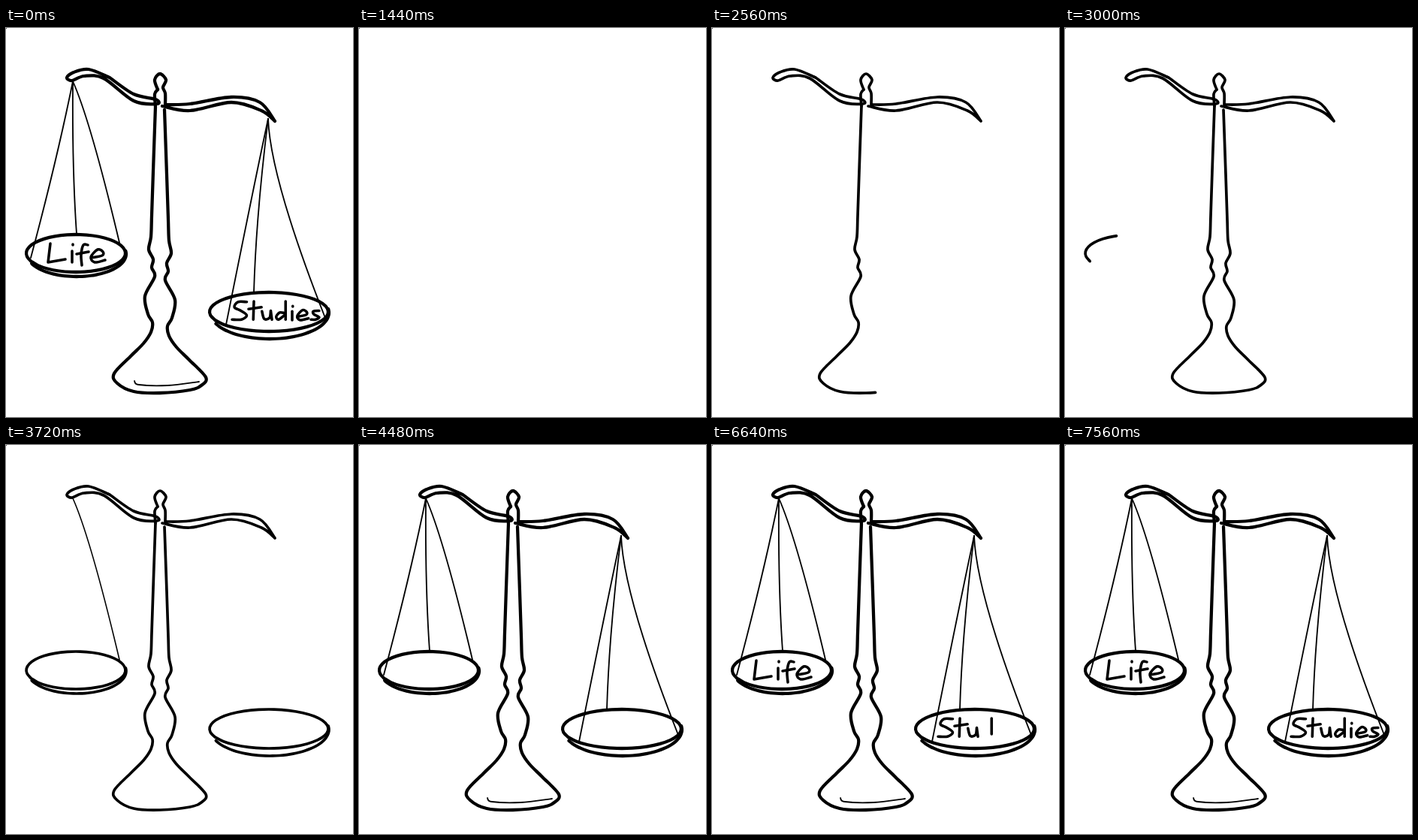
Animation, 462 px wide and 518 px high, one loop 8400 ms. Source, as an HTML page:

```html
<!DOCTYPE html>
<html lang="en">
<head>
<meta charset="utf-8">
<title>Life and Studies on a balance</title>
<style>
  html, body { margin: 0; width: 100%; height: 100%; overflow: hidden; background: #fff; }
  svg { display: block; width: 462px; height: 518px; }
  path { fill: none; stroke: #000; stroke-linecap: round; stroke-linejoin: round; }
</style>
</head>
<body>
<svg id="stage" viewBox="0 0 462 518" role="img" aria-label="Scales: Life against Studies">
  <rect width="1" height="1" fill="#444"/>
</svg>
<script>
const LOOP = 8400, STEP = 40, CLEAR = 1440, INKED = 4440;
const BODY = 3.7, THIN = 1.6, PEN = 3.1, INK_SPREAD = 1.15;

const parse = text => text.split(' ').map(pair => pair.split(',').map(Number));

// Smooth curve through every point; a repeated point makes a corner
function curve(p) {
  let d = `M${p[0]}`;
  for (let i = 0; i < p.length - 1; i++) {
    const a = p[i], b = p[i + 1], before = p[i - 1] || a, after = p[i + 2] || b;
    if (String(a) === String(b)) continue;
    const c1 = a.map((v, k) => v + (b[k] - before[k]) / 6);
    const c2 = b.map((v, k) => v - (after[k] - a[k]) / 6);
    d += `C${c1} ${c2} ${b}`;
  }
  return d;
}

const sketch = text => curve(parse(text));

// Turned column: one side runs down, the foot crosses, the mirrored side runs back up
function column(axis, profile, foot, drop) {
  const half = parse(profile);
  const left = half.map(([r, y]) => [axis - r, y]);
  const right = half.map(([r, y]) => [axis + r, y + drop]).reverse();
  return curve([...left, ...parse(foot), ...right]);
}

function arc(cx, cy, rx, ry, from, to) {
  return curve(Array.from({ length: 25 }, (_, i) => {
    const angle = (from + (to - from) * i / 24) * Math.PI / 180;
    return [cx + rx * Math.cos(angle), cy + ry * Math.sin(angle)];
  }));
}

// A dish and the lower rim under it
const pan = (cx, cy, rx, ry, depth) => [
  arc(cx, cy, rx, ry, 155, 515),
  arc(cx + 1, cy + 1, rx, ry + depth, 155, -8),
];

// Letter strokes relative to the baseline
const glyphs = {
  L: '3,-25 0,0 0,0 23,-4',
  i: '0,-15 0,0|1,-24 1,-23',
  f: '15,-23 9,-23 6,-10 7,4|0,-11 16,-14',
  e: '1,-6 16,-9 17,-14 10,-17 1,-7 6,0 20,-3',
  S: '25,-31 10,-31 4,-22 15,-16 25,-8 16,-1 0,-1',
  t: '9,-32 8,-1|0,-19 22,-22',
  u: '1,-15 5,-2 14,-4 16,-16 16,-16 18,-1',
  d: '17,-32 17,-1|15,-12 7,-13 1,-6 5,-1 16,-9',
  s: '14,-16 4,-15 5,-10 14,-5 8,-1 0,-1',
};

const letters = (word, xs, baseline, size) => [...word].flatMap((letter, i) =>
  glyphs[letter].split('|').map(stroke =>
    curve(parse(stroke).map(([x, y]) => [xs[i] + x * size, baseline + y * size]))));

const leftHook = 'M89,71Q', rightHook = 'M349,121Q';
const stage = document.getElementById('stage');
const sections = [];

// Strokes of one section follow each other at a constant pen speed
function section(start, end, ...strokes) {
  let total = 0;
  const lines = strokes.map(([width, d]) => {
    const path = document.createElementNS('http://www.w3.org/2000/svg', 'path');
    path.setAttribute('d', d);
    stage.append(path);
    const length = path.getTotalLength(), offset = total;
    total += length;
    return { path, width, length, offset };
  });
  sections.push({ start, end, total, lines });
}

const using = (width, paths) => paths.map(d => [width, d]);

section(1520, 2160, ...using(BODY, [
  sketch('202,82 198,69 205,61 213,69 209,79 212,87 212,102 212,102 245,101 300,92 338,99 358,124 358,124 340,110 300,99 245,110 208,104'),
  sketch('138,66 170,88 199,95 201,101 170,97 130,67 104,64 88,70 81,66 90,59 110,55 138,66'),
]));
section(2180, 2900, ...using(BODY, [
  sketch('202,82 198,88 199,104'),
  column(205, '6,104 9,190 11,250 12,278 15,295 9,308 11,319 7,331 20,357 16,381 10,392 12,405 22,420 39,437 61,460',
    '148,473 170,484 205,486 245,482 260,476', 5),
]));
section(2960, 3720,
  ...using(BODY, [...pan(93, 300, 66, 25, 5), ...pan(350, 378, 79, 26, 9)]),
  [THIN, leftHook + '113,125 152,290']);
section(3740, 4470, ...using(THIN, [
  leftHook + '68,175 33,306',
  leftHook + '88,190 94,274',
  rightHook + '330,210 293,395',
  rightHook + '333,250 330,352',
  rightHook + '352,200 425,386',
  sketch('171,470 177,475 215,476 257,471'),
]));
section(4600, 5440, ...using(PEN, letters('Life', [56, 88, 94, 112], 312, 1)));
section(5480, 7560, ...using(PEN,
  letters('Studies', [301, 323, 340, 359, 381, 387, 406], 389, 0.78)));

function draw(now) {
  const t = Math.floor((now % LOOP) / STEP) * STEP;
  const whole = t < CLEAR;
  const spread = whole || t >= INKED ? INK_SPREAD : 1;
  for (const { start, end, total, lines } of sections) {
    const inked = whole ? total : total * (t - start) / (end - start);
    for (const { path, width, length, offset } of lines) {
      const drawn = inked - offset;
      path.style.visibility = drawn > 0 ? 'visible' : 'hidden';
      path.style.strokeDasharray = drawn < length ? `${Math.max(0, drawn)} ${length * 2}` : 'none';
      path.style.strokeWidth = width * spread;
    }
  }
}

const origin = performance.now();
function tick() {
  draw(performance.now() - origin);
  requestAnimationFrame(tick);
}
tick();
</script>
</body>
</html>
```
